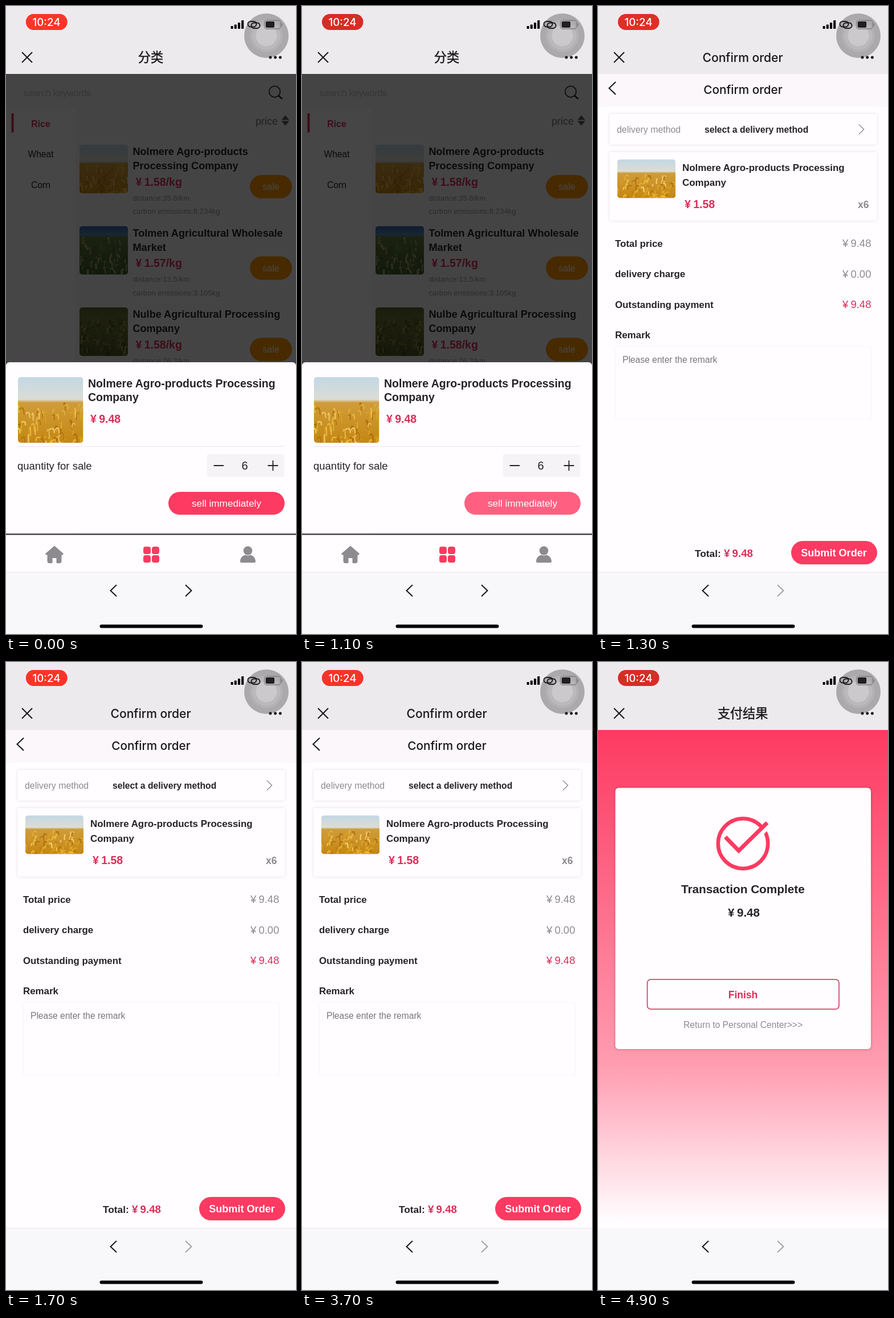
Write an HTML page that moves like this. It is 509 px wide and 1100 px high and loops after 5000 ms.

```html
<!DOCTYPE html>
<html lang="en">
<head>
<meta charset="utf-8">
<title>Order flow</title>
<style>
  html, body { margin: 0; width: 100%; height: 100%; overflow: hidden; background: #fffdff; }
  svg { display: block; width: 100%; height: 100%; }
</style>
</head>
<body>
<svg id="stage" viewBox="0 0 509 1100"></svg>
<script>
const SANS = "'Liberation Sans', Arial, sans-serif";
const UI = "Inter, sans-serif";
const CJK = "'Noto Sans CJK SC', 'Noto Sans CJK', sans-serif";
const PINK = '#fd3a61', RED = '#d92f58', INK = '#252328', GREY = '#8d8b90', WHITE = '#fffdff';
const LOOP = 5000;

let seed = 7;
const rnd = () => (seed = seed * 16807 % 2147483647) / 2147483647;

const text = (x, y, s, size, fill, { bold = 400, at = 'start', font = SANS, extra = '' } = {}) =>
  `<text x="${x}" y="${y}" font-family="${font}" font-size="${size}" font-weight="${bold}" text-anchor="${at}" fill="${fill}" ${extra}>${s}</text>`;
const bold = (x, y, s, size, fill = INK, at) => text(x, y, s, size, fill, { bold: 700, at });
const mid = (x, y, s, size, fill) => text(x, y, s, size, fill, { at: 'middle' });
const box = (x, y, w, h, fill, r = 0, extra = '') =>
  `<rect x="${x}" y="${y}" width="${w}" height="${h}" rx="${r}" fill="${fill}" ${extra}/>`;
const line = (d, stroke, width = 2) =>
  `<path d="${d}" fill="none" stroke="${stroke}" stroke-width="${width}"/>`;
const disc = (x, y, r, fill) => `<circle cx="${x}" cy="${y}" r="${r}" fill="${fill}"/>`;
const yen = (x, y, sum, size, fill, weight = 700) =>
  text(x, y, '¥', size, fill, { bold: weight }) + text(x + size * .78, y, sum, size, fill, { bold: weight });

// A field picture: sky fading into a crop, with short curved ears on top.
let photos = 0;
function photo(x, y, w, h, [sky, haze, crop, soil, ...ears], horizon) {
  const id = 'p' + photos++;
  let stalks = '';
  for (let i = 0; i < 75; i++) {
    const px = x + rnd() * w, py = y + h * (horizon + .06 + rnd() * (1 - horizon));
    const lean = (rnd() - .5) * w * .16, rise = h * (.04 + rnd() * .07);
    stalks += line(`M${px} ${py + rise}q0 ${-rise * 2} ${lean} ${-rise}`, ears[i % ears.length], 1 + rnd() * w / 70);
  }
  return `<linearGradient id="${id}g" x2="0" y2="1">
      <stop stop-color="${sky}"/><stop offset="${horizon - .02}" stop-color="${haze}"/>
      <stop offset="${horizon + .03}" stop-color="${crop}"/><stop offset="1" stop-color="${soil}"/>
    </linearGradient>
    <clipPath id="${id}">${box(x, y, w, h, '#000', 5)}</clipPath>
    <g clip-path="url(#${id})">${box(x, y, w, h, `url(#${id}g)`)}${stalks}</g>`;
}
const WHEAT = ['#c3d8e5', '#dcdcd4', '#cf9c3a', '#c58713', '#e8b93a', '#b3700f', '#dc9f20', '#efc560'];
const RICE = ['#2c62a8', '#5b8bb5', '#63783a', '#3d5a2c', '#a9a765', '#3f6030', '#c5b67c', '#6f8a45'];
const PADDY = ['#56672d', '#6a7434', '#6d7232', '#4d5424', '#a39a50', '#48591f', '#8b8641', '#333f18'];

function listRow(i, [first, second, price, km, carbon], palette, horizon) {
  const y = 243 + i * 142.5, note = '#98969b';
  return photo(129, y, 85, 85, palette, horizon)
    + bold(222.5, y + 18, first, 18.1) + bold(222.5, y + 43, second, 18.1)
    + yen(227.5, y + 71.5, price + '/kg', 19.5, RED)
    + text(222.5, y + 97.5, `distance:${km}/km`, 13.2, note)
    + text(222.5, y + 121, `carbon emissions:${carbon}kg`, 13.2, note)
    + box(428, y + 53, 74, 41, '#ff9800', 20.5) + mid(465, y + 79, 'sale', 16, '#fff');
}

const forward = colour => line('M315 1014l10.500 10-10.500 10', colour);
const navTitle = s => text(254, 97.5, s, 21.1, '#17161a', { bold: 500, at: 'middle', font: UI });
const cjkTitle = s => text(254, 98, s, 22.2, '#17161a',
  { bold: 500, at: 'middle', font: CJK, extra: 'stroke="#17161a" stroke-width=".4"' });
const confirmHeader = navTitle('Confirm order') + forward('#a5a3a8')
  + box(0, 119, 509, 57, '#fbf7fa') + line('M31 133l-11.500 11 11.500 11', '#17161a')
  + text(254.5, 154, 'Confirm order', 20.7, '#17161a', { bold: 500, at: 'middle', font: UI });

const list = box(0, 119, 509, 808, '#f7f5f8') + box(0, 180, 122, 747, WHITE)
  + text(31, 158, 'search keywords', 15.8, '#bfbdc2')
  + `<circle cx="471.500" cy="150" r="9.700" fill="none" stroke="${INK}" stroke-width="1.600"/>`
  + line('M478.500 157l6.500 6', INK, 2.5)
  + text(438, 208, 'price', 18, '#77757a')
  + `<path d="M483.500 199.500l6.800-8 6.800 8zm0 2h13.600l-6.800 8z" fill="#5a585d"/>`
  + box(9.5, 188, 4, 33.5, RED) + bold(61, 211.5, 'Rice', 15.8, RED, 'middle')
  + mid(61, 265, 'Wheat', 15.6, INK) + mid(61, 318.5, 'Corn', 15.8, INK)
  + listRow(0, ['Nolmere Agro-products', 'Processing Company', '1.58', '35.8', '8.234'], WHEAT, .36)
  + listRow(1, ['Tolmen Agricultural Wholesale', 'Market', '1.57', '13.5', '3.105'], RICE, .2)
  + listRow(2, ['Nulbe Agricultural Processing', 'Company', '1.58', '76.3', '17.549'], PADDY, .2);

const shop = cjkTitle('分类') + forward('#17161a')
  + list + box(0, 119, 509, 808, '#000', 0, 'opacity=".72"')
  + box(0, 624, 509, 300, WHITE, 6) + box(0, 900, 509, 24, WHITE)
  + photo(21, 650, 114.5, 115, WHEAT, .36)
  + bold(144, 668, 'Nolmere Agro-products Processing', 19.5) + bold(144, 692, 'Company', 19.5)
  + yen(148, 729.5, '9.48', 19.5, RED)
  + box(20, 771, 469, 1, '#e6e5ea')
  + text(20, 812, 'quantity for sale', 18.5, INK)
  + box(353, 785, 135.5, 40, '#f5f3f6', 2)
  + line('M364.500 805h17.500M459.500 805h18M468.500 796v18', INK, 1.8) + mid(419, 811.5, '6', 20, INK)
  + box(285, 851, 204, 40, PINK, 20, 'id="sell"') + mid(387, 877, 'sell immediately', 17.15, '#fff')
  + box(0, 926.5, 509, 64.5, WHITE)
  + `<path d="M85 946l15 13q1 2-1 2h-2v12q0 2.500-2.500 2.500H89v-9h-8v9h-5.500q-2.500 0-2.500-2.500v-12h-2q-2 0-1-2z" fill="${GREY}" stroke="${GREY}" stroke-linejoin="round"/>`
  + [0, 1, 2, 3].map(i => box(241 + i % 2 * 15, 947 + (i >> 1) * 15, 13, 13, PINK, 4)).join('')
  + disc(424.5, 954, 7.8, GREY)
  + `<path d="M411 973c0-7 5-10.500 9-11.500q4.500 2.500 9 0c4 1 9 4.500 9 11.500q0 2-2 2h-23q-2 0-2-2z" fill="${GREY}"/>`;

const card = (y, h) => box(20, y, 469.5, h, WHITE, 4, 'filter="url(#soft)"');
const sumRow = (y, label, sum, colour) => bold(30, y - .5, label, 16.8) + yen(429, y, sum, 18.5, colour, 400);
const order = confirmHeader
  + card(189, 53.5) + text(33, 222, 'delivery method', 15.9, GREY)
  + bold(187, 222, 'select a delivery method', 15.7) + line('M458 207.500l8.500 8.500-8.500 8.500', '#9b999e', 1.7)
  + card(256, 120) + photo(34, 268.5, 102, 68, WHEAT, .33)
  + bold(148, 288.5, 'Nolmere Agro-products Processing', 16.9) + bold(148, 314.5, 'Company', 16.9)
  + yen(152, 353.5, '1.58', 19.5, RED) + bold(475.5, 353.5, 'x6', 17.5, GREY, 'end')
  + sumRow(422, 'Total price', '9.48', GREY)
  + sumRow(475.5, 'delivery charge', '0.00', GREY)
  + sumRow(529, 'Outstanding payment', '9.48', RED)
  + bold(30, 581.5, 'Remark', 16.9)
  + box(30, 596.5, 449.5, 127.5, 'none', 2, 'stroke="#f6f4f7"')
  + text(43, 625, 'Please enter the remark', 15.6, '#77757a')
  + bold(170, 964.5, 'Total:', 17.3) + yen(221, 964.5, '9.48', 18.7, RED)
  + box(339, 937, 151, 41, PINK, 20.5) + bold(414, 963.5, 'Submit Order', 18.1, '#fff', 'middle');

const result = cjkTitle('支付结果') + forward('#a5a3a8')
  + box(0, 119, 509, 873, 'url(#blush)')
  + box(30.5, 220.5, 448.5, 457.5, WHITE, 6, 'filter="url(#lift)"')
  + `<circle cx="254.500" cy="318" r="43.700" fill="none" stroke="${PINK}" stroke-width="6.500"/>`
  + line('M283 304l18-18', WHITE, 8) + line('M223.500 306.500l23.500 24 50-49', PINK, 7)
  + bold(254.3, 404.5, 'Transaction Complete', 20.75, INK, 'middle')
  + yen(228, 446, '9.48', 20.5, INK)
  + box(86.5, 556, 336.5, 52, 'none', 6, 'stroke="#c92e53" stroke-width="1.500"')
  + bold(254.5, 589, 'Finish', 17.5, RED, 'middle')
  + mid(254.5, 640.5, 'Return to Personal Center&gt;&gt;&gt;', 15.65, GREY);

const chrome = box(0, 0, 509, 119, '#edeaed')
  + disc(457, 52, 39, '#aba9ab') + disc(457, 52, 29, '#b3b1b3') + disc(457, 52, 24.5, '#bbb9bb') + disc(457, 52, 18.5, '#cbc9cb')
  + [5, 7.5, 11, 15].map((h, i) => box(394.5 + i * 6.2, 40 - h, 4.2, h, '#0c0b0d', 1)).join('')
  + box(424.5, 27, 15, 9.5, 'none', 4.7, 'stroke="#1b1a1c" stroke-width="2"')
  + box(430.5, 29.5, 15, 9.5, 'none', 4.7, 'stroke="#1b1a1c" stroke-width="2"')
  + box(453.5, 25, 28.5, 15, 'none', 4.5, 'stroke="#7f7d80" stroke-width="1.300"')
  + box(455.7, 27, 15.5, 11, '#1f1e20', 2.5) + box(483.5, 30, 1.8, 5, '#7f7d80', 1)
  + [464, 472.7, 481.4].map(x => disc(x, 90, 2.5, '#17161a')).join('')
  + line('M28 81l18 18m0-18l-18 18', '#17161a')
  + box(35, 14, 72.5, 28, '#d82c26', 14) + box(35, 14, 72.5, 28, '#ff342a', 14, 'id="glow"')
  + text(71, 35, '10:24', 18.7, '#fff', { bold: 500, at: 'middle', font: UI })
  + box(0, 991, 509, 109, '#f8f7fa') + box(0, 991, 509, 1, '#e9e7ea')
  + line('M194 1014l-10.500 10 10.500 10', '#17161a') + box(164.5, 1083.5, 181, 6, '#050506', 3);

const scenes = [
  { from: 0, art: shop }, { from: 1200, art: confirmHeader },
  { from: 1300, art: order }, { from: 3800, art: result }
];
const stage = document.getElementById('stage');
stage.innerHTML = `<defs>
    <linearGradient id="blush" x2="0" y2="1">
      <stop stop-color="#fd3a61"/><stop offset=".67" stop-color="#ff9cb0"/><stop offset=".985" stop-color="#fffdff"/>
    </linearGradient>
    <filter id="soft"><feDropShadow dx="0" dy="0" stdDeviation="2" flood-color="#69606f" flood-opacity=".22"/></filter>
    <filter id="lift"><feDropShadow dx="0" dy="0" stdDeviation="2" flood-color="#402028" flood-opacity=".4"/></filter>
  </defs>${box(0, 0, 509, 1100, WHITE)}${chrome}`
  + scenes.map(s => `<g class="scene">${s.art}</g>`).join('');
const groups = stage.querySelectorAll('.scene');
const glow = document.getElementById('glow'), sell = document.getElementById('sell');

const ease = p => { p = Math.min(1, Math.max(0, p)); return p * p * (3 - 2 * p); };

function draw(t) {
  const now = scenes.findLastIndex(s => t >= s.from);
  groups.forEach((g, i) => g.style.display = i === now ? '' : 'none');
  sell.setAttribute('fill', t >= 1000 ? '#ff6081' : PINK);
  const beat = t % 2100;
  glow.setAttribute('opacity', 1 - ease((beat - 50) / 600) + ease((beat - 1120) / 600));
}

const start = performance.now();
(function frame() {
  draw((performance.now() - start) % LOOP);
  requestAnimationFrame(frame);
})();
</script>
</body>
</html>
```
